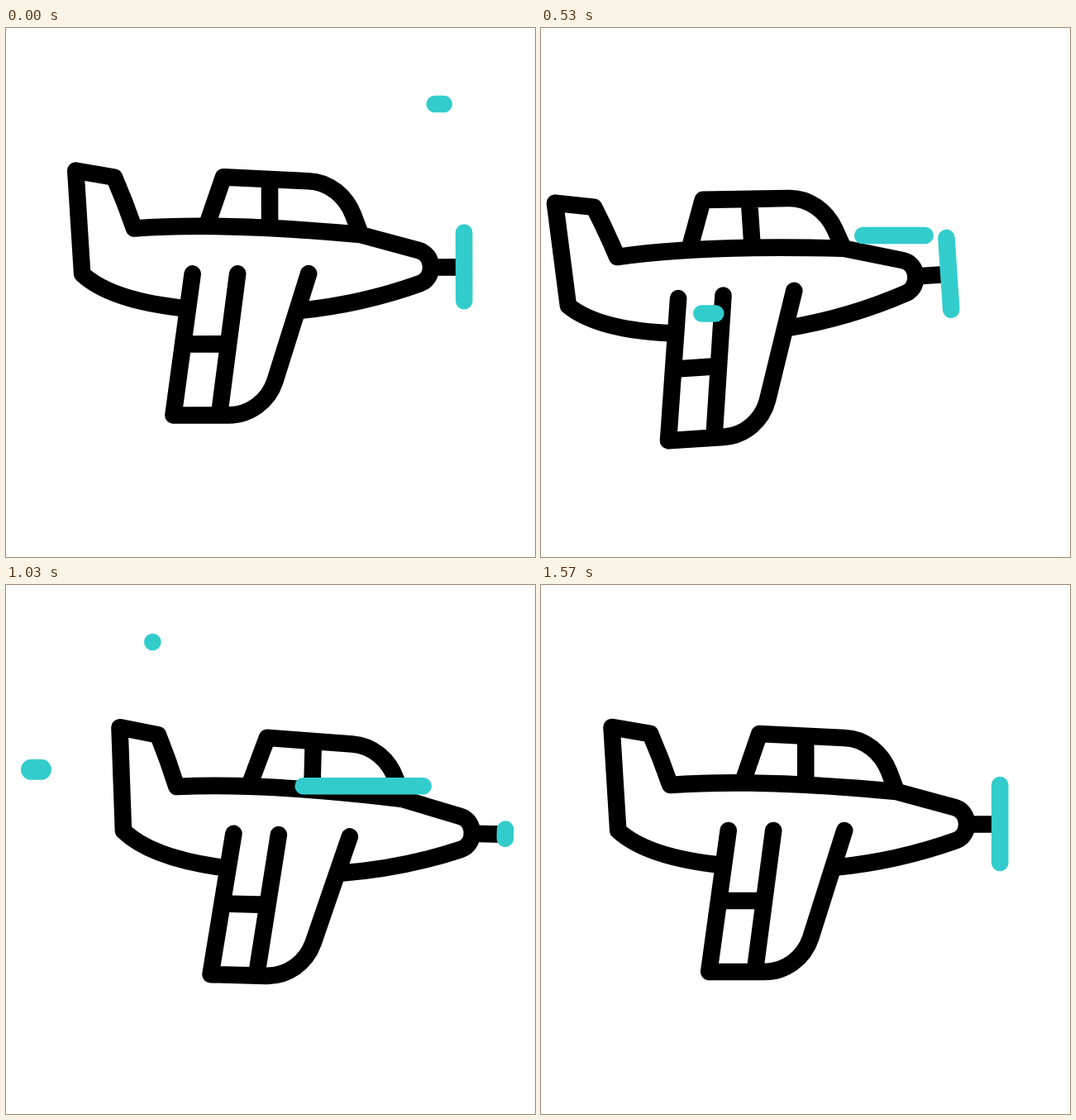
An HTML page for the animation above (1.67 s loop, 640x640 px).

```html
<!DOCTYPE html>
<html lang="en">
<head>
<meta charset="utf-8">
<title>Propeller plane</title>
<style>
html, body { margin: 0; width: 100%; height: 100%; overflow: hidden; background: #fff; }
svg { display: block; width: 100vw; height: 100vh; }
.ink { fill: none; stroke: #000; stroke-width: 20.6; stroke-linejoin: round; }
.round { stroke-linecap: round; }
.teal { stroke: #33cccc; stroke-width: 20.6; stroke-linecap: round; }
</style>
</head>
<body>
<svg viewBox="0 0 640 640">
  <g id="plane">
    <g class="ink">
      <path d="M220 339C170 334 120 322 93 297L85.3 172L132 180Q145 210 156 242Q260 234 430 250L500 269C519 274 520 302 502 309Q432 334 357 341.5"/>
      <path d="M244 238L264 180L367 185C392 186 412 203 421 226L430 250M320 183V241"/>
      <path d="M514 289.5H552M215 382H269"/>
      <path class="round" d="M226.5 297L203 468H270C296 468 318 451 326 427L367 297M281 297L258.5 468"/>
    </g>
    <line id="prop" class="teal" x1="555" x2="555"/>
  </g>
  <g id="streaks"></g>
</svg>
<script>
const LOOP = 1670, LAST = 47;
const $ = id => document.getElementById(id);

// Key poses as [tick, value]; one tick is a thirtieth of a second.
const posX = [[-1, 300], [14, 236], [23, 281], [33.5, 357], [47.5, 300]];
const posY = [[-1, 300], [14.5, 325.7], [23, 317.3], [33.5, 303.6], [47.5, 300]];
const tilt = [[-1, 0], [12, -5.3], [26, 2.2], [39, 0], [48, 0]];
const turns = [[0, -0.12], [23, 4.5], [31, 6.5], [47, 10]];

// Each streak runs left by REACH; its tail follows the head after a delay.
const REACH = 220, SWEEP = 6.7;
const streak = (y, right, start, { delay = 5.1, width = 20.6 } = {}) =>
  ({ y, right, start, delay, width });
const streaks = [
  streak(92, 540, -0.95, { delay: 6.6 }),
  streak(207, 220, 5.3, { delay: 3.1 }),
  streak(345.5, 404, 5.4),
  streak(251, 599, 7),
  streak(69, 387, 19.3),
  streak(223.3, 238, 20.21, { width: 25 }),
  streak(330.5, 571, 18.7, { width: 22 }),
  streak(243.3, 515, 26.6, { delay: 4.5 })
];

const ease = v => {
  v = Math.min(1, Math.max(0, v));
  return v * v * (3 - 2 * v);
};

function segment(keys, t) {
  let i = 0;
  while (i < keys.length - 2 && t >= keys[i + 1][0]) i++;
  return i;
}

function linear(keys, t) {
  const i = segment(keys, t), [t0, a] = keys[i], [t1, b] = keys[i + 1];
  return a + (b - a) * (t - t0) / (t1 - t0);
}

// Monotone cubic: flat at ends and turning points.
function smooth(keys, t) {
  const rate = i => (keys[i + 1][1] - keys[i][1]) / (keys[i + 1][0] - keys[i][0]);
  const slope = i => {
    if (i === 0 || i === keys.length - 1) return 0;
    const a = rate(i - 1), b = rate(i);
    return a * b > 0 ? 2 * a * b / (a + b) : 0;
  };
  const i = segment(keys, t), [t0, a] = keys[i], [t1, b] = keys[i + 1];
  const h = t1 - t0, u = (t - t0) / h, v = 1 - u;
  return a + (b - a) * ease(u) + h * u * v * (slope(i) * v - slope(i + 1) * u);
}

function setAll(node, attrs) {
  for (const name in attrs) node.setAttribute(name, attrs[name]);
}

for (const s of streaks) {
  s.bar = document.createElementNS("http://www.w3.org/2000/svg", "line");
  setAll(s.bar, { class: "teal", y1: s.y, y2: s.y });
  s.bar.style.strokeWidth = s.width;
  $("streaks").append(s.bar);
}

function draw(ms) {
  const tick = Math.min(LAST, Math.floor((Math.floor(ms / 10) * 3 + 1) / 10));

  const dx = smooth(posX, tick) - 300, dy = smooth(posY, tick) - 300;
  setAll($("plane"), {
    transform: `translate(${dx} ${dy}) rotate(${smooth(tilt, tick)} 300 300)`
  });

  const half = 47 * (0.56 + 0.44 * Math.cos(2 * Math.PI * linear(turns, tick)));
  setAll($("prop"), { y1: 289 - half, y2: 289 + half });

  for (const { bar, right, start, delay, width } of streaks) {
    const from = right - width / 2, run = REACH - width;
    const head = (tick - start) / SWEEP, tail = head - delay / SWEEP;
    setAll(bar, { x1: from - run * ease(head), x2: from - run * ease(tail) });
    bar.style.display = head > 0 && tail < 1 ? "" : "none";
  }
}

const begin = performance.now();
function loop() {
  draw((performance.now() - begin) % LOOP);
  requestAnimationFrame(loop);
}
loop();
</script>
</body>
</html>
```
